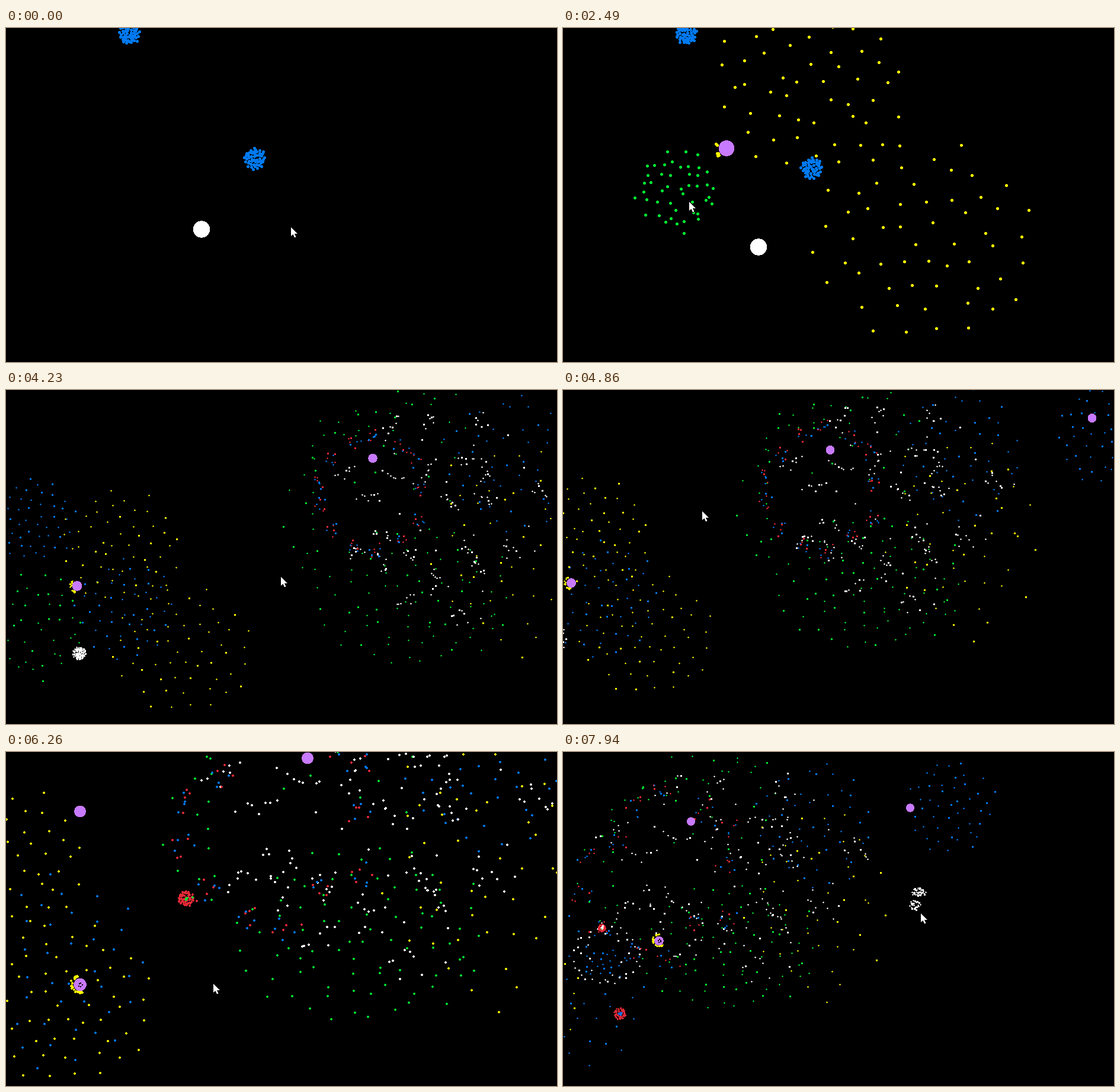
An HTML page with a canvas that plays this animation: 930 by 565 pixels, repeating every 8000 ms.

```html
<!DOCTYPE html>
<html>
<head>
<meta charset="utf-8">
<title>Particle life</title>
<style>
html, body { margin: 0; width: 100%; height: 100%; overflow: hidden; background: #000; }
canvas { display: block; }
</style>
</head>
<body>
<canvas id="stage" width="930" height="565"></canvas>
<script>
const ctx = document.getElementById('stage').getContext('2d');
const LOOP = 8000, TAU = Math.PI * 2, GOLDEN = 2.399963, BIG_BANG = 2950;
const BLUE = '#0079f1', YELLOW = '#fdf900', GREEN = '#00e430',
      RED = '#e62937', PURPLE = '#c87aff', WHITE = '#fff';

const rnd = n => { const v = Math.sin(n * 127.1 + 311.7) * 43758.5453; return v - Math.floor(v); };
const jig = n => rnd(n) - .5;
const mix = (a, b, u) => a + (b - a) * u;
const clamp = u => Math.min(1, Math.max(0, u));
const smooth = u => u * u * (3 - 2 * u);

// Keys are [time, x, y]; the ends are held.
function at(keys, t, ease = u => u) {
  let i = 1;
  while (i < keys.length - 1 && keys[i][0] <= t) i++;
  const [t0, x0, y0] = keys[i - 1], [t1, x1, y1] = keys[i];
  const u = ease(clamp((t - t0) / (t1 - t0)));
  return [mix(x0, x1, u), mix(y0, y1, u)];
}

// Camera moves: start, end, then the view reached as scale and offset
const moves = [
  [2950, 4000, .625, -82.5, 214.4], [4230, 5000, .6, -239, 195], [5840, 6240, .8, -389, 136],
  [6400, 7000, .71, -387, 183.5], [7310, 7800, .57, -424, 207]
];
const cameraAt = t => moves.reduce((view, [from, to, ...next]) => {
  const u = smooth(clamp((t - from) / (to - from)));
  return view.map((v, i) => mix(v, next[i], u));
}, [1, 0, 0]);

const pointer = [
  [0, 481, 337], [280, 610, 345], [720, 418, 98], [1250, 276, 203], [1580, 190, 273],
  [2490, 213, 294], [4230, 464, 316], [5200, 146, 161], [5420, 356, 252], [5700, 281, 278],
  [6260, 350, 392], [6850, 265, 470], [7310, 381, 382], [7660, 600, 232], [7940, 604, 273]
];
const hero = [
  [2490, 276, 203], [4230, 324, 187], [5420, 463, 240],
  [6260, 642, 321], [7310, 865, 336], [7940, 1028, 196]
];
const heroBorn = 1200;

// r0 grows to r with time constant tau from `spread` on; vx, vy accelerate the centre.
const base = { born: 0, tau: 450, squash: 1, power: .5, jitter: .6, vx: 0, vy: 0, fall: 0 };
const make = o => {
  const c = { ...base, ...o };
  c.r0 = c.r0 ?? c.r;
  c.spread = c.spread ?? c.born;
  return c;
};
const field = (color, n, x, y, r, squash, jitter = .9) =>
  make({ color, n, x, y, r, squash, jitter, born: BIG_BANG });
const redOne = { born: 5700, x: 867, y: 139, vx: -1.5, vy: 4 };
const redTwo = { born: 6830, x: 912, y: 414 };

const clouds = [
  make({ color: BLUE, n: 48, x: 208, y: 10, r0: 18, r: 125, spread: 2560, tau: 700, jitter: .4 }),
  make({ color: BLUE, n: 48, x: 420, y: 221, r0: 18, r: 260, spread: 2560, tau: 2500, vx: 12, vy: 4, fall: 16, jitter: .4 }),
  make({ color: YELLOW, n: 56, x: 612, y: 342, r0: 8, r: 188, squash: .93, born: 280, fall: 17 }),
  make({ color: YELLOW, n: 52, x: 408, y: 98, r0: 8, r: 170, squash: .9, born: 720, vx: 2.6, vy: -1.5 }),
  make({ color: GREEN, n: 46, x: 190, y: 272, r0: 8, r: 240, born: 1570, tau: 3000, vx: 2, vy: 3, jitter: .9 }),
  make({ color: WHITE, n: 72, x: 330, y: 340, r0: 12, r: 240, spread: 4150, tau: 3500, fall: 30, solid: true }),
  field(GREEN, 84, 1240, 220, 270, .72, .8),
  field(GREEN, 20, 1210, -220, 220, .9),
  field(YELLOW, 46, 1500, 85, 228, 1.25),
  field(BLUE, 48, 1490, -145, 173, 1.12),
  field(BLUE, 48, 1890, -200, 137, 1, .6),
  field(WHITE, 30, 1340, 0, 270, 1.1),
  make({ color: WHITE, n: 42, x: 873, y: 242, r0: 10, r: 170, squash: .86, born: 6560, tau: 1500, power: .2 }),
  make({ color: BLUE, n: 17, x: 865, y: 258, r0: 8, r: 100, squash: .7, born: 6600, tau: 1500 }),
  make({ ...redOne, color: RED, n: 46, r0: 20, r: 8, tau: 1500, power: .42 }),
  make({ ...redOne, color: GREEN, n: 3, r: 3 }),
  make({ ...redOne, color: WHITE, n: 5, r: 5, born: 7550, y: 158, vy: 0, x: 860 }),
  make({ ...redTwo, color: RED, n: 46, r0: 10, r: 18, power: .34 }),
  make({ ...redTwo, color: BLUE, n: 6, r: 4.5 }),
  make({ color: WHITE, n: 34, x: 1797, y: 53, r0: 6, r: 23, squash: .6, born: 7620, tau: 150, jitter: 1 }),
  make({ color: WHITE, n: 22, x: 1786, y: 91, r0: 6, r: 17, born: 7740, tau: 100, jitter: 1 })
];

const discs = [
  { born: 0, keys: [[0, 1124, -160], [LOOP, 1122, -157]] },
  { born: 5200, keys: [[5420, 642, -57], [7310, 642, -31]] },
  { born: 0, keys: [[5420, 1857, -248], [7940, 1772, -198]] }
];

let view;

function toScreen(x, y) {
  const [s, ox, oy] = view;
  return [x * s + ox, y * s + oy];
}

function dot(x, y) {
  const [px, py] = toScreen(x, y);
  const d = Math.max(3, Math.round(5 * view[0]));
  const left = Math.round(px - d / 2), top = Math.round(py - d / 2);
  if (d === 3 && px - Math.floor(px) < .35) return ctx.fillRect(left, top, 3, 3);
  ctx.fillRect(left, top + 1, d, d - 2);
  ctx.fillRect(left + 1, top, d - 2, d);
}

// Filled circle without smoothing
function disc(color, x, y, radius) {
  const [px, py] = toScreen(x, y).map(Math.round), r = radius * view[0];
  ctx.fillStyle = color;
  for (let row = -Math.floor(r); row <= r; row++) {
    const half = Math.round(Math.sqrt(r * r - row * row));
    ctx.fillRect(px - half, py + row, half * 2, 1);
  }
}

// Place of item i in a jittered sunflower of n items inside the unit circle
function seat(i, n, power, jitter, seed) {
  const a = i * GOLDEN + seed, r = ((i + .5) / n) ** power;
  const k = seed * 97 + i * 2, gap = jitter * 1.6 / Math.sqrt(n);
  return [r * Math.cos(a) + jig(k) * gap, r * Math.sin(a) + jig(k + 1) * gap];
}

function drawCloud(c, seed, t) {
  if (t < c.born) return;
  const age = Math.max(0, t - c.spread), sec = age / 1000;
  const r = mix(c.r0, c.r, 1 - Math.exp(-age / c.tau));
  const x = c.x + c.vx * sec * sec;
  const y = c.y + c.vy * sec * sec + c.fall * smooth(clamp(t / 2490));
  const sway = r < 25 ? .5 : 0;
  if (c.solid && age === 0) return disc(c.color, x, y, 14.2);
  ctx.fillStyle = c.color;
  for (let i = 0; i < c.n; i++) {
    const [u, v] = seat(i, c.n, c.power, c.jitter, seed);
    dot(x + r * u + sway * Math.sin(t / 90 + i),
        y + r * c.squash * v + sway * Math.cos(t / 110 + i * 2));
  }
}

// Open left and upper edge of the big colony
function drawRim(late) {
  ctx.fillStyle = GREEN;
  const rx = mix(325, 420, late);
  for (let i = 0; i < 32; i++) {
    const a = (150 + 140 * (i + rnd(i + 70)) / 32) * TAU / 360, r = .74 + .26 * rnd(i + 30);
    dot(1205 + rx * r * Math.cos(a), 10 + 370 * r * Math.sin(a));
  }
}

// Short bent chains of white cells
function drawStrands(late) {
  const count = 22, wide = mix(1, 1.8, late);
  ctx.fillStyle = WHITE;
  for (let k = 0; k < count; k++) {
    const [u, v] = seat(k, count, .5, .7, 31);
    const x = mix(1285, 1215, late) + u * mix(270, 370, late);
    const y = v * 325 - 10;
    const a = rnd(k + 500) * TAU, bend = jig(k + 600) * .7;
    for (let j = 0; j < 7; j++) {
      const d = (j - 3) * 9 * wide, b = a + bend * j, n = k * 20 + j;
      dot(x + d * Math.cos(b) + jig(n) * 20 * wide, y + d * Math.sin(b) + jig(n + 9) * 20 * wide);
    }
  }
}

// Red and blue knots on a widening ring
function drawKnots(late, t) {
  const count = 13, wide = mix(1, 1.7, late);
  for (let k = 0; k < count; k++) {
    const a = k / count * TAU + jig(k + 40) * .3;
    const r = mix(140, 150 + 100 * rnd(k + 60), late);
    const x = mix(1120, 1030, late) + r * Math.cos(a);
    const y = mix(-60, 10, late) + r * 1.1 * Math.sin(a);
    for (let j = 0; j < 8; j++) {
      ctx.fillStyle = j < 4 ? RED : BLUE;
      const b = rnd(k * 31 + j + 900) * TAU + t / 2500, d = (6 + 17 * rnd(k * 17 + j + 950)) * wide;
      dot(x + d * Math.cos(b), y + d * Math.sin(b));
    }
  }
}

function drawDisc({ born, keys }, t) {
  if (t < born) return;
  const [x, y] = at(keys, t);
  if (born && t - born < 300)
    drawCloud(make({ color: PURPLE, n: 30, x, y, r: 12, jitter: 1.4 }), 40, t);
  else disc(PURPLE, x, y, 12.4);
}

// The roaming cell drags along a growing crescent of yellow ones.
function drawHero(t) {
  if (t < heroBorn) return;
  const [x, y] = at(hero, t), sec = (t - heroBorn) / 1000;
  const half = Math.min(2.3, .4 + .28 * sec);
  ctx.fillStyle = YELLOW;
  for (let i = 0; i < 5 * sec; i++) {
    const a = 3 + half * 2 * jig(i + 210), r = 15.5 + 4 * rnd(i + 240);
    dot(x + r * Math.cos(a), y + r * Math.sin(a));
  }
  disc(PURPLE, x, y, 13.4);
  if (t < 5000) return;
  ctx.fillStyle = '#000';
  for (let i = 0; i < 5; i++) {
    const a = i * GOLDEN + t / 800;
    const [px, py] = toScreen(x + 4 * Math.cos(a), y + 4 * Math.sin(a)).map(Math.round);
    ctx.fillRect(px, py, 2, 2);
  }
}

function drawPointer(t) {
  const [x, y] = at(pointer, t, smooth).map(Math.round);
  ctx.beginPath();
  [[0, 0], [0, 15], [3.5, 12], [6, 17.5], [8.5, 16.5], [6, 11], [11, 11]]
    .forEach(([dx, dy]) => ctx.lineTo(x + dx, y + dy));
  ctx.closePath();
  ctx.lineWidth = 2;
  ctx.strokeStyle = '#000';
  ctx.stroke();
  ctx.fillStyle = WHITE;
  ctx.fill();
}

function draw(now) {
  const t = now % LOOP, late = clamp((t - 4230) / 3000);
  view = cameraAt(t);
  ctx.fillStyle = '#000';
  ctx.fillRect(0, 0, 930, 565);
  clouds.forEach((c, i) => drawCloud(c, i + 1, t));
  if (t > BIG_BANG) {
    drawRim(late);
    drawStrands(late);
    drawKnots(late, t);
  }
  discs.forEach(d => drawDisc(d, t));
  drawHero(t);
  drawPointer(t);
}

const start = performance.now();
function loop() {
  draw(performance.now() - start);
  requestAnimationFrame(loop);
}
loop();
</script>
</body>
</html>
```
